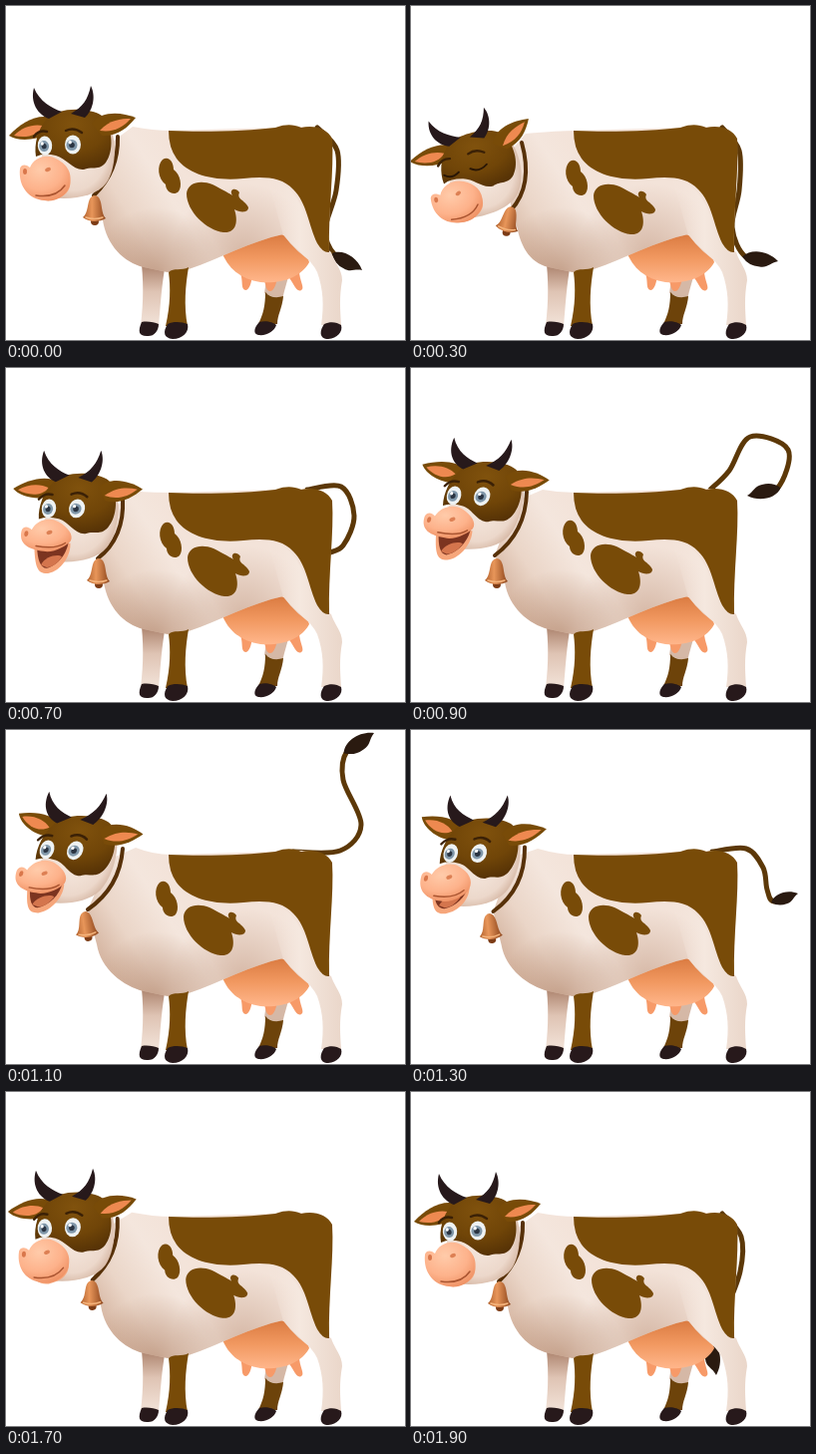
Recreate the animation shown at these times as an HTML page. Size 400 by 335 pixels, loop 2 s.

```html
<!DOCTYPE html>
<html lang="en">
<head>
<meta charset="utf-8">
<title>Cow</title>
<style>
  html, body { margin: 0; width: 100%; height: 100%; overflow: hidden; background: #fff; }
  svg { display: block; width: 400px; height: 335px; }
  .brown { fill: #784b08; }
  .dark { fill: #27191b; }
  .line { fill: none; stroke-linecap: round; stroke-linejoin: round; }
</style>
</head>
<body>
<svg viewBox="0 0 400 335">
  <defs>
    <linearGradient id="hide" gradientUnits="userSpaceOnUse" x1="88" y1="225" x2="180" y2="165">
      <stop offset="0" stop-color="#d3b29d"/><stop offset=".35" stop-color="#ead5c7"/>
      <stop offset=".75" stop-color="#f4e6dd"/><stop offset="1" stop-color="#f3e3d9"/>
    </linearGradient>
    <linearGradient id="haunch" gradientUnits="userSpaceOnUse" x1="270" y1="0" x2="340" y2="0">
      <stop offset="0" stop-color="#f4e6dd" stop-opacity=".2"/><stop offset=".35" stop-color="#f5e8df"/>
      <stop offset="1" stop-color="#e9d5c8"/>
    </linearGradient>
    <linearGradient id="shin" gradientUnits="userSpaceOnUse" x1="0" y1="258" x2="0" y2="322">
      <stop offset="0" stop-color="#a97f69"/><stop offset=".45" stop-color="#dfc4b4"/><stop offset="1" stop-color="#f3e4da"/>
    </linearGradient>
    <radialGradient id="chestShade" gradientUnits="userSpaceOnUse" cx="150" cy="268" r="66">
      <stop offset="0" stop-color="#b0846a" stop-opacity=".6"/><stop offset="1" stop-color="#b0846a" stop-opacity="0"/>
    </radialGradient>
    <radialGradient id="bellyShade" gradientUnits="userSpaceOnUse" cx="238" cy="250" r="72">
      <stop offset="0" stop-color="#b88c72" stop-opacity=".5"/><stop offset="1" stop-color="#b88c72" stop-opacity="0"/>
    </radialGradient>
    <linearGradient id="udder" x2="0" y2="1">
      <stop offset="0" stop-color="#d97a40"/><stop offset=".5" stop-color="#f19860"/><stop offset="1" stop-color="#ffb68b"/>
    </linearGradient>
    <radialGradient id="muzzle" cx=".4" cy=".3" r=".75">
      <stop offset="0" stop-color="#ffcbaa"/><stop offset=".6" stop-color="#fdb28b"/><stop offset="1" stop-color="#ee9062"/>
    </radialGradient>
    <radialGradient id="cheek" cx=".45" cy=".45" r=".65">
      <stop offset="0" stop-color="#f8ece4"/><stop offset=".7" stop-color="#ecd8cb"/><stop offset="1" stop-color="#cba892"/>
    </radialGradient>
    <radialGradient id="mask" cx=".5" cy=".25" r=".75">
      <stop offset="0" stop-color="#80520d"/><stop offset=".6" stop-color="#704508"/><stop offset="1" stop-color="#573306"/>
    </radialGradient>
    <linearGradient id="bellFill">
      <stop offset="0" stop-color="#b0602c"/><stop offset=".4" stop-color="#e8965a"/><stop offset="1" stop-color="#8c451c"/>
    </linearGradient>
    <g id="eye">
      <ellipse rx="8" ry="9.5" fill="#eef2f3"/>
      <circle cx="-1" cy=".5" r="5.5" fill="#8097a9"/>
      <circle cx="-1" cy=".5" r="2.8" fill="#2a3442"/>
      <circle cx="-2.8" cy="-2.2" r="1.7" fill="#fff"/>
    </g>
  </defs>

  <!-- far legs, tail and udder -->
  <path fill="url(#shin)" d="M135 250C138 275 138 296 135 320L153 322C155 298 156 280 160 258Z"/>
  <path class="dark" d="M136 317C141 316 149 317 153 319C153 326 148 332 141 331C133 331 132 326 136 317Z"/>
  <path fill="#d5b8a6" d="M262 268L284 268C281 280 278 288 277 296L259 288Z"/>
  <path fill="#6d430a" d="M260 287C265 293 272 293 278 291C277 303 272 310 272 319L253 319C258 309 260 300 260 287Z"/>
  <path class="dark" d="M254 317C260 315 268 317 271 320C269 326 262 331 253 330C247 329 249 322 254 317Z"/>
  <path id="tail" class="line" stroke="#5c3808" stroke-width="5"/>
  <path id="tuft" fill="#2a1a10"/>
  <g fill="#f79a68">
    <path d="M235 268L247 270C246 278 244 285 240 285C235 284 238 276 235 268Z"/>
    <path d="M257 272L272 272C271 280 268 287 264 286C260 285 261 278 257 272Z"/>
    <path d="M282 270L294 266C294 275 300 283 296 285C291 288 288 277 282 270Z"/>
  </g>
  <path fill="url(#udder)" d="M216 246C222 263 235 274 255 277C276 279 296 272 304 257C300 242 287 231 272 228Z"/>

  <!-- body and near legs -->
  <path id="body" fill="url(#hide)"/>
  <path id="chestTone" fill="url(#chestShade)"/>
  <path id="bellyTone" fill="url(#bellyShade)"/>
  <path fill="url(#haunch)" d="M262 173C292 178 302 212 308 232L326 247C329 257 337 264 337 275C334 292 335 304 336 320L316 320C319 300 318 284 312 267C306 254 292 246 278 230Z"/>
  <path class="brown" d="M163 125C200 127 245 125 270 122C282 118 288 119 296 122C309 119 322 123 327 133C329 165 323 205 324 247Q318 248 312 238C303 219 302 198 288 184C276 171 258 171 238 173C208 176 183 169 171 153Q163 142 163 125Z"/>
  <g id="spots" class="brown">
    <path d="M157 154C163 150 168 156 168 164C175 169 177 181 173 186C168 191 160 186 160 179C152 173 151 160 157 154Z"/>
    <path d="M181 188C182 177 195 174 207 179C217 184 222 187 227 190C223 184 230 181 234 187C231 194 239 194 243 202C243 208 234 207 229 204C233 216 231 228 218 227C201 225 181 206 181 188Z"/>
  </g>
  <path class="brown" d="M163 267C168 262 176 266 183 262C180 280 178 300 182 321L160 321C165 300 165 282 163 267Z"/>
  <path class="dark" d="M162 319C168 316 177 317 182 319C184 327 177 334 167 334C158 333 157 327 162 319Z"/>
  <path class="dark" d="M319 319C325 316 332 317 336 320C338 327 332 333 323 334C314 334 314 326 319 319Z"/>

  <path id="collar" class="line" stroke="#573109" stroke-width="4"/>
  <g id="bell">
    <circle cy="11" r="4" fill="#7d3c16"/>
    <path fill="url(#bellFill)" d="M-4-13Q0-17 4-13C8-7 6 3 11 8C5 12-6 12-12 7C-6 2-8-8-4-13Z"/>
    <path class="line" stroke="#f5b47c" stroke-width="1.5" d="M-9 7Q0 10 8 7"/>
  </g>

  <g id="head">
    <path fill="url(#cheek)" d="M45 112C65 101 95 106 103 118C112 136 110 163 101 177C91 191 66 195 45 192L35 155Z"/>
    <g id="earLeft">
      <path class="brown" d="M46 112C30 108 15 117 3 130C12 136 30 135 41 128Z"/>
      <path fill="#ee8950" d="M8 130C16 121 28 118 37 120C33 130 20 133 8 130Z"/>
    </g>
    <path fill="url(#mask)" d="M40 114C50 101 84 101 96 110C108 124 108 146 100 157C93 166 86 160 78 164C67 165 61 153 50 150Q38 147 30 151C28 138 32 124 40 114Z"/>
    <g id="earRight">
      <path class="brown" d="M86 118C95 105 115 106 130 112C122 122 112 131 96 130Z"/>
      <path fill="#ee8950" d="M94 125C104 114 115 113 125 113C117 122 108 127 94 125Z"/>
    </g>
    <path class="dark" d="M28 82C24 97 32 109 43 113L56 106C45 102 34 96 28 82Z"/>
    <path class="dark" d="M85 80C91 92 86 106 79 112L65 108C77 101 82 94 85 80Z"/>
    <path id="jaw" fill="#f6a67b"/>
    <path id="mouth" fill="#7c3420"/>
    <path id="tongue" fill="#d4754d"/>
    <path id="snout" fill="url(#muzzle)"/>
    <path id="smile" class="line" stroke="#a95430" stroke-width="1.5"/>
    <ellipse cx="19" cy="166" rx="2" ry="3" fill="#d9774b"/>
    <ellipse cx="42" cy="164" rx="3" ry="2" fill="#dd8054" transform="rotate(-25 42 164)"/>
    <use id="eyeLeft" href="#eye"/>
    <use id="eyeRight" href="#eye"/>
    <path id="lids" class="line" stroke="#291605" stroke-width="2" d="M32 142Q39 148 47 142M59 141Q67 147 76 140"/>
    <path class="line" stroke="#3b2106" stroke-width="2.5" d="M28 131Q33 124 41 126M60 125Q68 121 76 127"/>
  </g>
</svg>
<script>
const LOOP = 2000, STEP = 100;

// head: dx, dy, angle, skew, height; ears: left, right; face: mouth opening, blink
// neck: nape x, y, chest x; collar: start, control, end; bell: x, y, angle
const rest = {
  head: [0, 0, 0, 0, 1], ears: [0, 0], face: [0, 0], neck: [127, 121, 97],
  collar: [112, 131, 113, 166, 88, 190], bell: [89, 205, 0], spots: [0, 0]
};
const poses = [
  { t: 0, ...rest },
  { t: 300, head: [0, 20, -12, 0, .94], ears: [15, -16], face: [0, 1], neck: [115, 128, 105],
    collar: [111, 137, 123, 180, 100, 205], bell: [98, 216, 12], spots: [2, 2] },
  { t: 700, head: [4, 2, 2, -4, 1], ears: [13, 8], face: [1, 0], neck: [134, 124, 98],
    collar: [117, 131, 119, 170, 92, 191], bell: [93, 206, 0], spots: [1, 2] },
  { t: 900, head: [4, -10, 4, -7, 1], ears: [28, 9], face: [1, 0], neck: [132, 122, 94],
    collar: [116, 124, 115, 165, 84, 188], bell: [86, 206, 0], spots: [-1, 0] },
  { t: 1100, head: [2, -18, 4, -9, 1], ears: [36, 9], face: [.9, 0], neck: [130, 118, 91],
    collar: [117, 119, 114, 158, 82, 180], bell: [81, 197, -8], spots: [-3, -1] },
  { t: 1500, head: [-.5, -12.5, 0, -8, 1], ears: [40, -8], face: [.25, 0], neck: [124, 120, 90],
    collar: [111, 116, 115, 160, 83, 184], bell: [79, 201, -5], spots: [-3, -1] },
  { t: 1800, ...rest }
];

// five points along the tail, then the tip of the tuft, which lags behind the swing
const tails = [
  { t: 0, points: [312, 122, 332, 145, 331, 185, 320, 225, 330, 250, 357, 265] },
  { t: 300, points: [312, 122, 329, 145, 329, 185, 322, 222, 336, 252, 368, 256] },
  { t: 700, points: [302, 122, 336, 119, 349, 148, 338, 178, 320, 187, 300, 200] },
  { t: 900, points: [300, 122, 319, 103, 340, 69, 378, 82, 367, 121, 337, 128] },
  { t: 1000, points: [294, 122, 332, 113, 348, 76, 362, 50, 378, 54, 391, 78] },
  { t: 1100, points: [288, 122, 335, 121, 356, 95, 338, 50, 342, 21, 369, 3] },
  { t: 1200, points: [294, 122, 335, 117, 355, 98, 362, 76, 369, 62, 389, 53] },
  { t: 1300, points: [302, 122, 336, 119, 353, 138, 357, 160, 364, 172, 388, 164] },
  { t: 1400, points: [310, 122, 330, 140, 332, 172, 328, 205, 333, 224, 354, 236] },
  { t: 1500, points: [308, 125, 315, 150, 312, 190, 305, 215, 300, 225, 298, 240] },
  { t: 1800, points: [308, 125, 320, 148, 318, 185, 308, 218, 299, 236, 300, 260] },
  { t: 1900, points: [312, 122, 331, 145, 330, 180, 315, 220, 300, 252, 306, 284] }
];

const part = id => document.getElementById(id);
const draw = (id, d) => part(id).setAttribute('d', d);
const place = (id, transform) => part(id).setAttribute('transform', transform);
const ease = k => k * k * (3 - 2 * k);

function sample(keys, track, time) {
  const last = keys.findLastIndex(key => key.t <= time);
  const a = keys[last], b = keys[last + 1];
  if (!b) return a[track];
  const k = ease((time - a.t) / (b.t - a.t));
  return a[track].map((v, i) => v + (b[track][i] - v) * k);
}

function drawTail(values) {
  const p = Array.from({ length: 6 }, (_, i) => values.slice(2 * i, 2 * i + 2));
  let d = `M${p[0]}`;
  for (let i = 0; i < 4; i++) {
    const before = p[Math.max(0, i - 1)], after = p[i + 2];
    const c1 = p[i].map((v, j) => v + (p[i + 1][j] - before[j]) / 6);
    const c2 = p[i + 1].map((v, j) => v - (after[j] - p[i][j]) / 6);
    d += `C${c1} ${c2} ${p[i + 1]}`;
  }
  draw('tail', d);
  const [x, y] = p[4], dx = p[5][0] - x, dy = p[5][1] - y;
  const at = (along, side) => [x + dx * along - dy * side, y + dy * along + dx * side];
  draw('tuft', `M${at(-.12, 0)}C${at(.1, -.3)} ${at(.65, -.3)} ${at(1, 0)}` +
    `C${at(.75, .08)} ${at(.7, .26)} ${at(.45, .24)}Q${at(.1, .26)} ${at(-.12, 0)}Z`);
}

function drawFace(open, blink) {
  const lip = 195 - 12 * open, chin = 195 + 10 * open;
  draw('jaw', `M28 ${lip - 8}C31 ${chin - 4} 35 ${chin + 1} 45 ${chin}C58 ${chin - 3} 66 186 64 174Z`);
  draw('mouth', `M31 ${lip - 5}Q34 ${chin - 5} 43 ${chin - 5}C54 ${chin - 8} 62 184 62 173Z`);
  draw('tongue', `M37 ${chin - 8}C40 ${chin - 17} 53 ${chin - 20} 57 ${chin - 17}Q51 ${chin - 6} 43 ${chin - 6}Z`);
  draw('snout', 'M14 163C16 157 22 160 24 162C28 152 40 148 50 153' +
    `C60 158 67 166 64 ${180 - 8 * open}C60 ${lip - 3 - 3 * open} 48 ${lip + 2} 38 ${lip}` +
    `C24 ${lip - 1} 12 ${182 - 5 * open} 14 163Z`);
  draw('smile', `M30 ${lip - 5}Q50 ${lip - 2} 59 ${180 - 6 * open}`);
  place('eyeLeft', `translate(39 140) rotate(-5) scale(.9 ${1 - blink})`);
  place('eyeRight', `translate(67 139) scale(1 ${1 - blink})`);
  part('lids').style.opacity = blink > .7 ? 1 : 0;
}

function render(time) {
  const get = track => sample(poses, track, time);
  const [headX, headY, angle, skew, height] = get('head');
  const [earLeft, earRight] = get('ears');
  const [napeX, napeY, chest] = get('neck');
  const [x1, y1, cx, cy, x2, y2] = get('collar');
  const [bellX, bellY, bellAngle] = get('bell');

  const body = `M${napeX} ${napeY}Q148 125 165 125L270 122Q318 117 327 133` +
    'C328 170 323 205 324 247L312 260Q291 248 278 229C245 236 215 253 183 264' +
    `L162 267L138 262C118 257 ${chest + 4} 240 ${chest} 215` +
    `Q${chest - 4} 200 ${x2} ${y2}L${x1 - 12} ${y1 + 10}Z`;
  ['body', 'chestTone', 'bellyTone'].forEach(id => draw(id, body));
  place('spots', `translate(${get('spots')})`);
  draw('collar', `M${x1} ${y1}Q${cx} ${cy} ${x2} ${y2}`);
  place('bell', `translate(${bellX} ${bellY}) rotate(${bellAngle})`);
  place('head', `translate(${70 + headX} ${140 + headY}) rotate(${angle}) skewX(${skew}) ` +
    `scale(1 ${height}) translate(-70 -140)`);
  place('earLeft', `rotate(${earLeft} 40 118)`);
  place('earRight', `rotate(${earRight} 92 119)`);
  drawFace(...get('face'));
  drawTail(sample(tails, 'points', time));
}

const start = performance.now();
function tick() {
  const elapsed = Math.max(0, performance.now() - start) % LOOP;
  render(Math.floor(elapsed / STEP) * STEP);
  requestAnimationFrame(tick);
}
tick();
</script>
</body>
</html>
```
